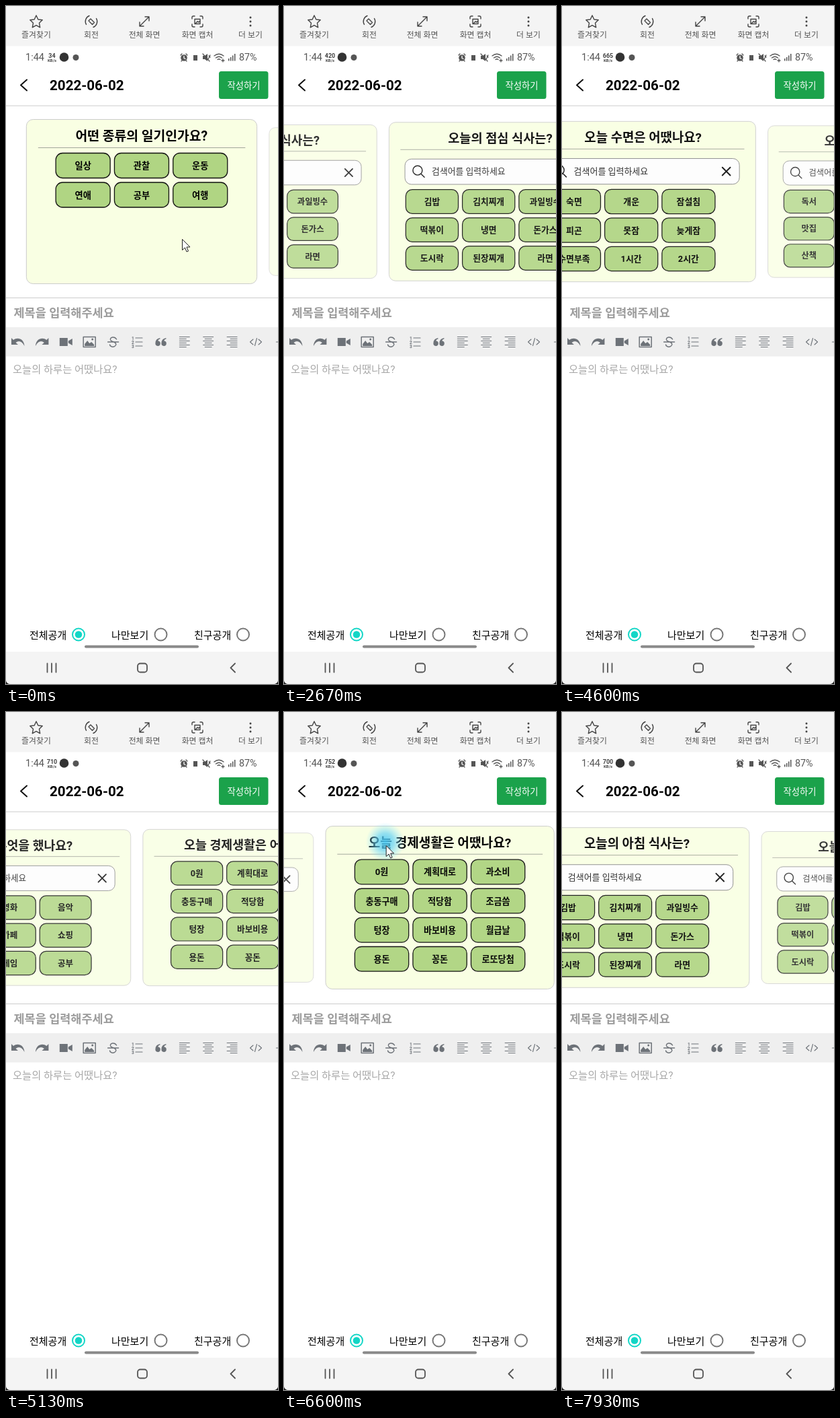
An HTML page that plays this animation: 405x1007 px, repeating every 8 s.

```html
<!DOCTYPE html>
<html lang="ko">
<head>
<meta charset="utf-8">
<style>
  html, body { margin: 0; width: 100%; height: 100%; overflow: hidden; background: #222; }
  svg { display: block; font-family: Roboto, "Noto Sans CJK KR", "Noto Sans CJK", sans-serif; }
  .line { fill: none; stroke-linecap: round; stroke-linejoin: round; }
  .mid { text-anchor: middle; }
</style>
</head>
<body>
<svg width="405" height="1007" viewBox="0 0 405 1007">
  <defs>
    <radialGradient id="cyan">
      <stop offset="0" stop-color="#48c8f4" stop-opacity=".9"/>
      <stop offset=".45" stop-color="#5fd0f6" stop-opacity=".65"/>
      <stop offset="1" stop-color="#8ee4ff" stop-opacity="0"/>
    </radialGradient>
  </defs>
  <path fill="#fff" d="M0 0H405V1000Q405 1007 398 1007H7Q0 1007 0 1000Z"/>

  <!-- top bar -->
  <path fill="#f4f4f4" d="M0 0H405V59.5H0Z"/>
  <g class="line" stroke="#444" stroke-width="1.4">
    <path d="M45 14l2.8 6 6.4.8-4.7 4.5 1.2 6.5-5.7-3.2-5.7 3.2 1.2-6.5-4.7-4.5 6.4-.8z"/>
    <path d="M123 22l3-3 5.500 5.500-3 3zM119.500 27.500A9 9 0 0 1 124 14.500M134.500 18.500A9 9 0 0 1 130 31.500"/>
    <path d="M199 30L213 16M207 16h6v6M199 24v6h6"/>
    <path d="M277 19v-2q0-2 2-2h2M289 15h2q2 0 2 2v2M293 27v2q0 2-2 2h-2M281 31h-2q-2 0-2-2v-2M281 19.500h8v7h-8zM282 26l3-3 2 1 2-2"/>
  </g>
  <g fill="#444"><circle cx="364" cy="17" r="1.5"/><circle cx="364" cy="23" r="1.5"/><circle cx="364" cy="29" r="1.5"/></g>
  <g class="mid" font-size="11.9" fill="#555">
    <text x="45" y="47">즐겨찾기</text><text x="127" y="47">회전</text><text x="206" y="47">전체 화면</text>
    <text x="285" y="47">화면 캡처</text><text x="364" y="47">더 보기</text>
  </g>

  <!-- status bar -->
  <g fill="#555">
    <text x="29" y="81" font-size="14.5">1:44</text>
    <text x="347" y="81" font-size="14.3">87%</text>
    <g class="mid" font-weight="700" fill="#444">
      <text id="speed" x="68.5" y="77" font-size="9"></text>
      <text x="68.5" y="82.5" font-size="6">KB/s</text>
    </g>
    <circle cx="86.5" cy="76" r="6.8" fill="#333"/>
    <circle cx="104" cy="76.5" r="4.5"/>
    <circle cx="265" cy="77" r="4.8"/>
    <rect x="279" y="73" width="6" height="8"/>
    <path d="M293 74h3l4-3v11l-4-3h-3zM331 78h1.5v3.5h-1.5zM334 76h1.5v5.5h-1.5zM337 73.5h1.5v8h-1.5zM340 71h1.5v10.5h-1.5z"/>
  </g>
  <g class="line" stroke="#555" stroke-width="1.3">
    <path d="M260 73l2-2M270 73l-2-2M261 82l1-1M269 82l-1-1M293 71l10 11M302 74l2 2M304 73l-3 6M310 74q7-5.500 14 0M312.500 77q4.500-3.500 9 0M315 79.500q2-1.500 4 0M321 81h4M323 79v4"/>
    <path stroke="#fff" d="M265 74.500v3l2 1"/>
  </g>

  <!-- header -->
  <path class="line" stroke="#111" stroke-width="2" d="M31 109.500L22 117.500L31 125.500"/>
  <text x="65" y="125" font-size="20.6" font-weight="700">2022-06-02</text>
  <rect x="317" y="97" width="73.5" height="41" rx="3.5" fill="#1ba24b"/>
  <text class="mid" x="354" y="122.5" font-size="13.3" fill="#fff">작성하기</text>
  <path stroke="#ddd" stroke-width="1.5" d="M0 148.300H405"/>

  <g id="cards"></g>

  <!-- editor -->
  <path stroke="#ccc" d="M0 433.500H405"/>
  <text x="11.5" y="462" font-size="17.5" font-weight="700" fill="#9c9c9c">제목을 입력해주세요</text>
  <path fill="#efefef" d="M0 477H405V520.500H0Z"/>
  <g id="tools" fill="#6d7278" stroke="#6d7278" stroke-width="0"></g>
  <text x="10" y="544.5" font-size="15.3" fill="#a8a8a8">오늘의 하루는 어땠나요?</text>

  <!-- visibility -->
  <g font-size="15">
    <text x="35" y="939.5">전체공개</text><text x="157" y="939.5">나만보기</text><text x="280" y="939.5">친구공개</text>
  </g>
  <g fill="none" stroke="#777" stroke-width="2">
    <circle cx="108" cy="933.5" r="9" stroke="#12d6c6"/>
    <circle cx="230.5" cy="933.5" r="9"/><circle cx="353" cy="933.5" r="9"/>
  </g>
  <circle cx="108" cy="933.5" r="5.3" fill="#12d6c6"/>

  <!-- navigation -->
  <path fill="#f4f4f4" d="M0 959H405V1000Q405 1007 398 1007H7Q0 1007 0 1000Z"/>
  <path class="line" stroke="#8a8a8a" stroke-width="4" d="M119 951.500H285"/>
  <g class="line" stroke="#555" stroke-width="1.8">
    <path d="M61.500 976.500v13M68 976.500v13M74.500 976.500v13M341 976.500l-6.500 6.500 6.500 6.500"/>
    <rect x="196" y="976.5" width="14" height="13" rx="4"/>
  </g>

  <circle id="glow" r="29" fill="url(#cyan)"/>
  <path id="cursor" fill="#fff" stroke="#222" d="M0 0V16L4 12.500L6.500 18.500L9 17.500L6.500 11.500H11.500Z"/>
</svg>
<script>
const $ = id => document.getElementById(id);
const W = 344.3, H = 245, LOOP = 8000;

const meals = '김밥 김치찌개 과일빙수 떡볶이 냉면 돈가스 도시락 된장찌개 라면';
// title, buttons, has a search box
const cards = [
  ['어떤 종류의 일기인가요?', '일상 관찰 운동 연애 공부 여행', false],
  ['오늘의 아침 식사는?', meals, true],
  ['오늘의 점심 식사는?', meals, true],
  ['오늘의 저녁 식사는?', meals, true],
  ['오늘 수면은 어땠나요?', '숙면 개운 잠설침 피곤 못잠 늦게잠 수면부족 1시간 2시간', true],
  ['오늘 무엇을 했나요?', '독서 영화 음악 맛집 카페 쇼핑 산책 게임 공부', true],
  ['오늘 경제생활은 어땠나요?', '0원 계획대로 과소비 충동구매 적당함 조금씀 텅장 바보비용 월급날 용돈 꽁돈 로또당첨', false],
  ['오늘 어떤 운동을 했나요?', '걷기 달리기 조깅 마라톤 수영 테니스 배드민턴 PT 자전거', true],
  ['오늘 반려동물과 무엇을 했나요?', '산책 간식 목욕 어질리티 병원 놀이', false],
];

const searchBox = `
  <rect x="25" y="57" width="294" height="39" rx="10" fill="#fdfdfd" stroke="#888"/>
  <g class="line" stroke="#111"><circle cx="44.500" cy="74.500" r="7.200" stroke-width="1.500"/>
  <path stroke-width="1.500" d="M50 80l5 5"/><path stroke-width="2" d="M293 70.500l12 12M305 70.500l-12 12"/></g>
  <text x="66.500" y="81" font-size="13.300" fill="#222">검색어를 입력하세요</text>`;

function button(label, i, search) {
  const x = (search ? 26.3 : 44.3) + i % 3 * 87.3;
  const y = (search ? 104 : 50.5) + Math.floor(i / 3) * 43.5;
  return `<rect x="${x}" y="${y}" width="81" height="37" rx="10" fill="#b0d583" stroke="#111" stroke-width="1.300"/>
    <text class="mid" x="${x + 40.5}" y="${y + 23.5}" font-size="13.200" font-weight="700">${label}</text>`;
}

$('cards').innerHTML = cards.map(([title, labels, search]) => `<g>
  <rect x=".5" y=".5" width="343.300" height="244" rx="10" fill="#f9ffe3" stroke="#ccc"/>
  <text class="mid" x="172" y="32" font-size="19.300" font-weight="700">${title}</text>
  <path stroke="#a3a69b" d="M18 42.500H326.500"/>
  ${search ? searchBox : ''}
  ${labels.split(' ').map((label, i) => button(label, i, search)).join('')}</g>`).join('');

const stroke = (d, w = 1.2) => `<path class="line" stroke-width="${w}" d="${d}"/>`;
const fill = d => `<path d="${d}"/>`;
const rows = n => Array.from({length: n}, (_, i) => i);
const align = x => stroke(rows(6).map(i =>
  `M${i % 2 ? x : -7.5} ${i * 3 - 7.5}h${i % 2 ? 10 : 15}`).join(''), 1);
const numbered = rows(3).map(i => stroke(`M-2 ${i * 6 - 6}H8`) +
  `<text x="-8" y="${i * 6 - 3.5}" font-size="6.500" font-weight="700">${i + 1}</text>`).join('');
const undo = fill('M-10-6V4H0L-3.500 1C1-3 6-1 9.500 6C9-5-1-8-7-3Z');
const quote = fill('M-1-6Q-8-5-8 2A3.700 3.700 0 1 0-4-1.500Q-4-4-1-4.500Z');
const tools = [
  undo,
  `<g transform="scale(-1 1)">${undo}</g>`,
  fill('M-9-6H3V6H-9ZM4-1.500L10-5V5L4 1.500Z'),
  stroke('M-9-7.500H9V7.500H-9Z', 1.5) + fill('M-7 6V3L-3-2L0 2L3 0L7 4V6ZM3-4a1.500 1.500 0 1 0 3 0a1.500 1.500 0 1 0-3 0'),
  stroke('M-8 0H8M5-4Q3-7.500-1-7Q-5-6-4-3Q-3-1 1 0Q5 2 4 4.500Q2 8-2 7Q-5 6-5 4', 1.4),
  numbered,
  quote + `<g transform="translate(9)">${quote}</g>`,
  align(-7.5), align(-5), align(-2.5),
  stroke('M-4-4L-8.500 0L-4 4M4-4L8.500 0L4 4M1.500-5.500L-1.500 5.500', 1.1),
  stroke('M-5 0H8'),
];
$('tools').innerHTML = tools.map((icon, i) =>
  `<g transform="translate(${18 + i * 35.4} 499)">${icon}</g>`).join('');

// Each swipe eases the carousel by a number of pages; the pointer drags only at its start.
const SWIPE = 450, DRAG = 150;
const swipes = [
  ...[1489, 2400, 3554, 3900, 4459, 4900, 5350, 5842].map(start => ({start, pages: 1})),
  {start: 6130, pages: -2},
  ...rows(4).map(i => ({start: 6519 + i * 371, pages: i === 1 ? -2 : -1})),
];
// The pointer first hovers, then drags slowly off the left edge.
const PRESS = 1070;
const hover = [[0, 262, 346], [70, 262, 346], [330, 135, 262], [PRESS, 135, 262], [1690, -1, 348]];
const speeds = [34, 420, 646, 665, 710, 752, 731, 700];

const mix = (a, b, k) => a + (b - a) * k;
const ease = k => k * k * (3 - 2 * k);
const progress = (t, start, length) => Math.min(1, Math.max(0, (t - start) / length));

const pageAt = t => swipes.reduce((sum, s) => sum + s.pages * ease(progress(t, s.start, SWIPE)), 0);

function pointerAt(t) {
  const i = hover.findIndex(key => key[0] > t);
  if (i > 0) {
    const [t0, x0, y0] = hover[i - 1], [t1, x1, y1] = hover[i];
    const k = progress(t, t0, t1 - t0);
    return {x: mix(x0, x1, k), y: mix(y0, y1, k), dir: 1, pressed: t >= PRESS};
  }
  const swipe = swipes.find(s => t >= s.start && t < s.start + DRAG);
  if (!swipe) return null;
  const dir = Math.sign(swipe.pages), k = progress(t, swipe.start, DRAG);
  return {x: 129 + dir * (67 - 300 * k * k), y: 198, dir, pressed: true};
}

function place(el, shown, x, y) {
  el.style.display = shown ? '' : 'none';
  el.setAttribute('transform', `translate(${x} ${y})`);
}

function draw(t) {
  const page = pageAt(t);
  [...$('cards').children].forEach((card, i) => {
    const away = Math.min(1, Math.abs(i - page));
    card.setAttribute('transform', `translate(${202 + (i - page) * W} 290.500)
      scale(${1 - .1 * away}) translate(${-W / 2} ${-H / 2})`);
    card.setAttribute('opacity', 1 - .3 * away);
  });

  $('speed').textContent = speeds[Math.max(0, Math.floor((t - 930) / 1000))];

  const {x, y, dir, pressed} = pointerAt(t) || {x: -99, y: 0, dir: 1, pressed: false};
  place($('cursor'), true, x + .5, y + .5);
  place($('glow'), pressed, x + 7 + 8 * dir, y - 5);
}

const start = performance.now();
function tick() {
  draw((performance.now() - start) % LOOP);
  requestAnimationFrame(tick);
}
tick();
</script>
</body>
</html>
```
